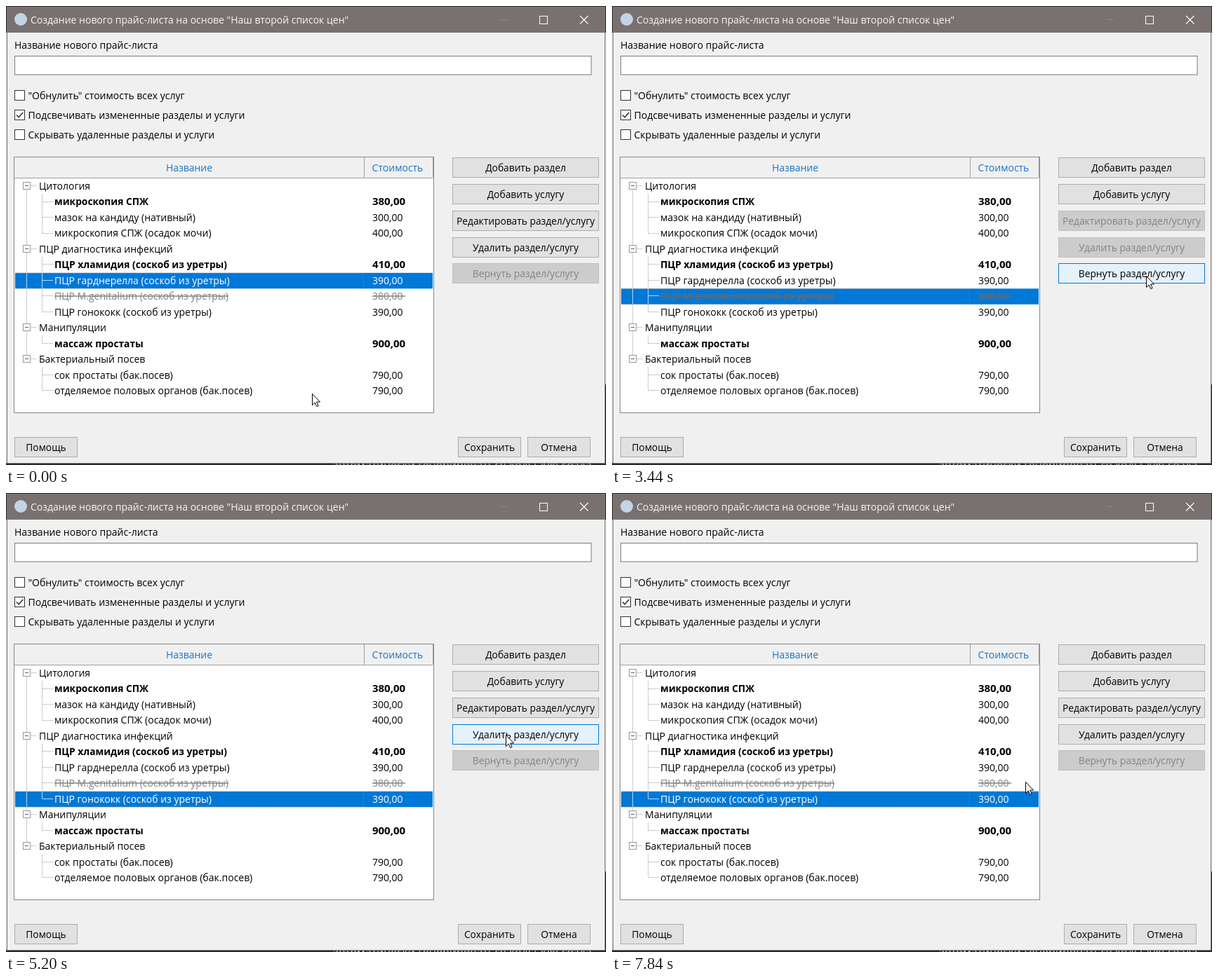
Write an HTML page that moves like this. It is 855 by 655 pixels and loops after 8 s.

```html
<!DOCTYPE html>
<html lang="ru">
<head>
<meta charset="utf-8">
<title>Создание нового прайс-листа</title>
<style>
  html, body { margin: 0; width: 100%; height: 100%; overflow: hidden; background: #f0f0f0; }
  svg { display: block; width: 855px; height: 655px; }
  text { font: 14px "Open Sans", "Noto Sans", sans-serif; white-space: pre; }
  .bold { font-weight: 700; font-size: 13.8px; }
  .bold.price { font-size: 15px; }
  .deleted { text-decoration: line-through; }
  .mid { text-anchor: middle; }
  .action { font-size: 13.8px; }
  .behind { font-size: 16px; }
</style>
</head>
<body>
<svg viewBox="0 0 855 655">
  <g id="window"></g>
  <g id="tree"></g>
  <g id="actions"></g>
  <path id="cursor" d="M.5 .5V16.5L4.2 13 6.8 18.6 9.1 17.5 6.6 12H11.5Z" fill="#fff" stroke="#000"/>
</svg>
<script>
const LOOP = 8000, TICK = 40;
const $ = id => document.getElementById(id);

const rect = (x, y, w, h, fill, stroke) => stroke
  ? `<rect x="${x + .5}" y="${y + .5}" width="${w - 1}" height="${h - 1}" fill="${fill}" stroke="${stroke}"/>`
  : `<rect x="${x}" y="${y}" width="${w}" height="${h}" fill="${fill}"/>`;
const text = (x, y, str, fill = '#000', cls = '') =>
  `<text x="${x}" y="${y}" fill="${fill}" class="${cls}">${str}</text>`;
const line = (d, stroke, extra = '') => `<path d="${d}" fill="none" stroke="${stroke}" ${extra}/>`;
const button = (x, y, w, label, fill = '#e1e1e1', stroke = '#adadad', color = '#000') =>
  rect(x, y, w, 29, fill, stroke) + text(x + w / 2, y + 20, label, color, 'mid action');

const ramp = (t, start, length) => Math.min(1, Math.max(0, (t - start) / length));
const ease = k => k * k * (3 - 2 * k);
const mix = (a, b, k) => a.map((v, i) => v + (b[i] - v) * k);
const rgb = c => `rgb(${c.map(Math.round)})`;
const grey = v => [v, v, v];

function checkbox(label, i) {
  const y = 120 + 28 * i, checked = i === 1;
  return rect(12, y, 15, 15, '#fff', '#333') + text(31.5, y + 13, label) +
    (checked ? line(`M15 ${y + 7.5}l3.2 3.3 6-6.8`, '#222', 'stroke-width="1.4"') : '');
}

function drawWindow() {
  return rect(0, 0, 855, 655, '#2b2b2b') +
    rect(0, 38, 1, 614, '#e4e4e4') + rect(854, 38, 1, 502, '#e4e4e4') +
    text(465, 661, 'автоматически генерироваться коды для созда', '#ccc', 'behind') +
    rect(1, 1, 853, 652, '#f0f0f0', '#797170') + rect(1, 1, 853, 37, '#797170') +
    '<circle cx="21" cy="19" r="9" fill="#c3d4e6"/>' +
    text(35, 25, 'Создание нового прайс-листа на основе "Наш второй список цен"', '#f5f5f5') +
    line('M704 19.5h11', '#8d8685') + rect(760, 14, 12, 12, 'none', '#fff') +
    line('M818 14l11.5 11.5M829.5 14L818 25.5', '#fff', 'stroke-width="1.1"') +
    text(12, 61, 'Название нового прайс-листа') +
    rect(12, 71, 822.5, 27.5, '#fff', '#7a7a7a') +
    ['"Обнулить" стоимость всех услуг', 'Подсвечивать измененные разделы и услуги',
      'Скрывать удаленные разделы и услуги'].map(checkbox).join('') +
    rect(11, 215, 599, 366, '#fff', '#828790') + rect(12, 216, 596, 29, '#f0f0f0') +
    line('M12 245.5H608M510.5 216V245M608.5 216V245', '#a0a0a0') +
    text(261, 236, 'Название', '#1a74c4', 'mid') + text(558, 236, 'Стоимость', '#1a74c4', 'mid') +
    button(12, 615, 90, 'Помощь') + button(644, 615, 90, 'Сохранить') + button(743, 615, 90, 'Отмена');
}

// Rows without a price are sections.
const rows = [
  ['Цитология'],
  ['микроскопия СПЖ', '380,00', 'bold'],
  ['мазок на кандиду (нативный)', '300,00'],
  ['микроскопия СПЖ (осадок мочи)', '400,00'],
  ['ПЦР диагностика инфекций'],
  ['ПЦР хламидия (соскоб из уретры)', '410,00', 'bold'],
  ['ПЦР гарднерелла (соскоб из уретры)', '390,00'],
  ['ПЦР M.genitalium (соскоб из уретры)', '380,00 ', 'deleted'],
  ['ПЦР гонококк (соскоб из уретры)', '390,00'],
  ['Манипуляции'],
  ['массаж простаты', '900,00', 'bold'],
  ['Бактериальный посев'],
  ['сок простаты (бак.посев)', '790,00'],
  ['отделяемое половых органов (бак.посев)', '790,00'],
];
const lastSection = rows.findLastIndex(row => !row[1]);
const deletedRow = rows.findIndex(row => row[2] === 'deleted');
const ROW = 22.47;

function drawRow([name, price, cls = ''], i, selected) {
  const y = 246 + ROW * i, end = y + ROW, mid = Math.floor(y + 10.6) + .5;
  const base = Math.round(y + 16);
  const dots = selected ? '' : 'stroke-dasharray="1 1"';
  const wire = selected ? '#b5d8f5' : '#999';
  if (!price) {
    const from = i ? y : mid, to = i === lastSection ? mid : end;
    return line(`M29.5 ${from}V${to}M36 ${mid}H44`, wire, dots) +
      rect(24, mid - 5.5, 11, 11, '#fff', '#999') + line(`M27 ${mid}h5`, '#3f5f9f') +
      text(47, base, name);
  }
  const color = cls === 'deleted' ? (selected ? '#6c6c6c' : '#808080') : selected ? '#fff' : '#000';
  const lastChild = !rows[i + 1]?.[1];
  return (selected ? rect(13, y, 595, ROW, '#0078d7') +
      line(`M13 ${y + .5}H509.5V${end - .5}H13`, '#ff8728', 'stroke-dasharray="1 1" stroke-opacity=".5"') : '') +
    (i < lastSection ? line(`M29.5 ${y}V${end}`, wire, dots) : '') +
    line(`M51.5 ${y}V${lastChild ? mid : end}M52 ${mid}H67`, wire, dots) +
    text(69, base, name, color, cls) + text(522, base, price, color, cls + ' price');
}

// Pointer moves: start, duration, destination x, y
const moves = [
  [320, 520, 294, 418],
  [1600, 400, 740, 372],
  [2000, 160, 765, 348],
  [2440, 320, 723, 375],
  [2880, 120, 823, 375],
  [3160, 120, 760, 385],
  [3400, 160, 767, 388],
  [3800, 240, 594, 427],
  [4280, 160, 760, 402],
  [4680, 440, 712, 345],
  [5520, 320, 524, 441],
  [6040, 640, 709, 345],
  [7360, 480, 589, 412],
];
const pointerAt = t => moves.reduce(
  (at, [start, length, ...to]) => mix(at, to, ease(ramp(t, start, length))), [436, 553]);

// Buttons react shortly after the selection moves; enabling fades slower than disabling.
const SELECT_DELETED = 960, SELECT_NEXT = 4240, REACTION = 80, ON = 280, OFF = 80;
const HOVER_TICKS = 6;
const actionTop = i => Math.round(216.4 + 37.75 * i);

// A button glows by the share of recent ticks the pointer spent on it.
function hoverAt(t, top) {
  let inside = 0;
  for (let k = 0; k < HOVER_TICKS; k++) {
    const [x, y] = pointerAt(t - k * TICK);
    if (x >= 636 && x < 845 && y >= top && y < top + 29) inside++;
  }
  return inside / HOVER_TICKS;
}

function drawAction(t, label, i, enabled) {
  const y = actionTop(i), hover = hoverAt(t, y) * enabled;
  const fill = mix(mix(grey(204), grey(225), enabled), [229, 241, 251], hover);
  const border = mix(mix(grey(191), grey(173), enabled), [0, 120, 215], hover);
  return button(636, y, 209, label, rgb(fill), rgb(border), rgb(mix(grey(131), grey(0), enabled)));
}

function drawActions(t) {
  const gone = SELECT_DELETED + REACTION, back = SELECT_NEXT + REACTION;
  const editable = 1 - ramp(t, gone, OFF) + ramp(t, back, ON);
  const restorable = ramp(t, gone, ON) - ramp(t, back, OFF);
  return [['Добавить раздел', 1], ['Добавить услугу', 1], ['Редактировать раздел/услугу', editable],
    ['Удалить раздел/услугу', editable], ['Вернуть раздел/услугу', restorable]]
    .map(([label, enabled], i) => drawAction(t, label, i, enabled)).join('');
}

let shownTick = -1, shownSelection = -1;
function render(t) {
  const selection = deletedRow + (t >= SELECT_NEXT ? 1 : t >= SELECT_DELETED ? 0 : -1);
  if (selection !== shownSelection) {
    $('tree').innerHTML = rows.map((row, i) => drawRow(row, i, i === selection)).join('');
    shownSelection = selection;
  }
  $('actions').innerHTML = drawActions(t);
  $('cursor').setAttribute('transform', `translate(${pointerAt(t).map(Math.round)})`);
}

function frame() {
  const tick = Math.floor(performance.now() % LOOP / TICK);
  if (tick !== shownTick) render((shownTick = tick) * TICK);
  requestAnimationFrame(frame);
}

$('window').innerHTML = drawWindow();
frame();
</script>
</body>
</html>
```
